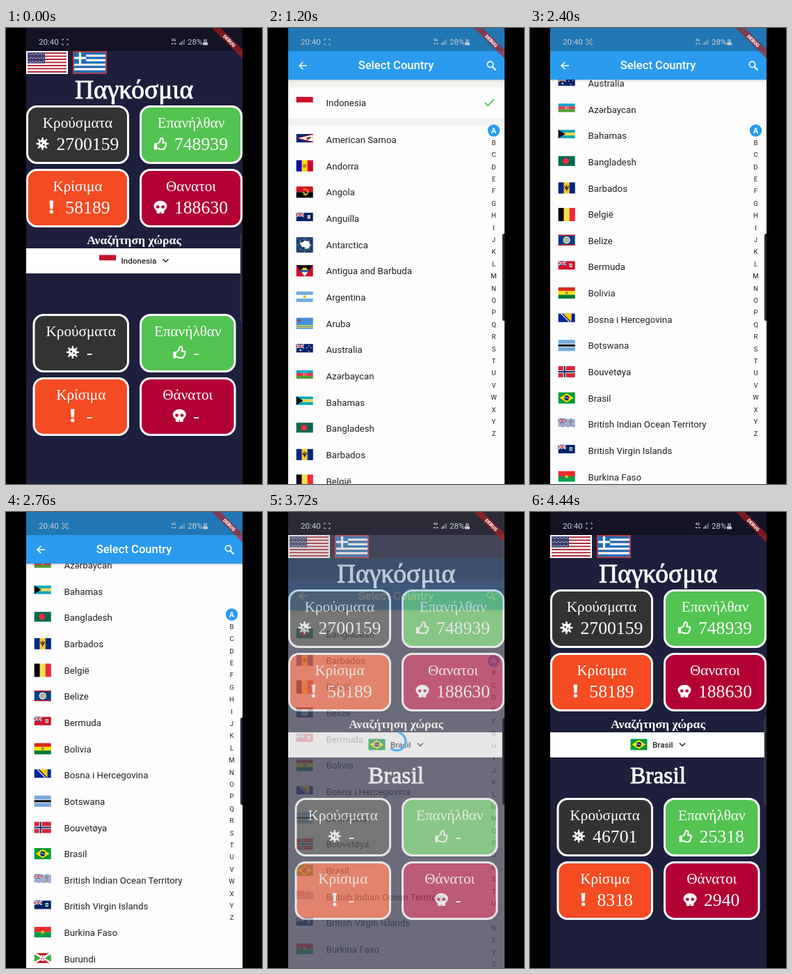
Write an HTML page that moves like this. It is 368 px wide and 654 px high and loops after 4.56 s.

```html
<!DOCTYPE html>
<html lang="el">
<head>
<meta charset="utf-8">
<title>Country statistics</title>
<style>
html, body { margin: 0; height: 100%; overflow: hidden; background: #000; }
svg { display: block; width: 100vw; height: 100vh; }
text { font-family: Roboto, sans-serif; white-space: pre; }
.serif { font-family: 'Liberation Serif', 'Times New Roman', serif; }
</style>
</head>
<body>
<svg viewBox="0 0 368 654"></svg>
<script>
const LOOP = 4560, STEP = 120;
const BLUE = '#2a9bee', NAVY = '#1e1f3c', RED = '#ce1126', WHITE = '#fff', GOLD = '#fcd116', ROYAL = '#00267f';

// Shape helpers
const rect = (x, y, w, h, fill, more = '') => `<rect x="${x}" y="${y}" width="${w}" height="${h}" fill="${fill}" ${more}/>`;
const disc = (x, y, r, fill, more = '') => `<circle cx="${x}" cy="${y}" r="${r}" fill="${fill}" ${more}/>`;
const path = (d, fill) => `<path d="${d}" fill="${fill}"/>`;
const line = (d, color, w = 1.6) => `<path d="${d}" fill="none" stroke="${color}" stroke-width="${w}"/>`;
const at = (x, y, s, id = '') => `<g id="${id}" transform="translate(${x} ${y})">${s}</g>`;
const group = (id, s) => `<g id="${id}">${s}</g>`;
const clip = (id, y, s) => `<clipPath id="${id}">${rect(29, y, 311, 654 - y, WHITE)}</clipPath><g clip-path="url(#${id})">${s}</g>`;
const text = (x, y, s, size, fill, more = '') =>
  `<text x="${x}" y="${y + size * .35}" font-size="${size}" fill="${fill}" ${more}>${s}</text>`;
const MID = 'text-anchor="middle"';
const range = n => [...Array(n).keys()];

// Flags are 24 units wide
const rows = (h, ...c) => c.map((f, i) => rect(0, i * h / c.length, 24, h / c.length + .1, f)).join('');
const cols = (h, ...c) => c.map((f, i) => rect(i * 24 / c.length, 0, 24 / c.length + .1, h, f)).join('');
const jack = (w = 11, h = 6) => rect(0, 0, w, h, '#012169') + line(`M0 0L${w} ${h}M0 ${h}L${w} 0`, WHITE, 1.2) +
  line(`M${w / 2} 0V${h}M0 ${h / 2}H${w}`, WHITE, 2) + line(`M${w / 2} 0V${h}M0 ${h / 2}H${w}`, RED, 1);
const ensign = (fill, badge) => rows(12, fill) + jack() + badge;
const shield = (x, y, fill) => rect(x - 2, y - 2.5, 4, 5, WHITE) + disc(x, y, 1.5, fill);

const flags = {
  Indonesia: [16, rows(16, '#c8102e', WHITE)],
  'American Samoa': [12, rows(12, '#002868') + path('M24 0V12L0 6Z', RED) + path('M24 1V11L3 6Z', WHITE) +
    path('M14 6l4-2 4 1-3 2-3 2z', '#7b3f1d')],
  Andorra: [16, cols(16, '#10069f', '#fedd00', '#d50032') + disc(12, 8, 2.6, '#c7784d')],
  Angola: [16, rows(16, RED, '#000') + line('M10 5a4 4 0 1 1 0 6M9 8l6 4', GOLD, 1.3)],
  Anguilla: [12, ensign('#012169', shield(18, 6, '#f58b2b'))],
  Antarctica: [22, rect(0, 0, 24, 22, '#173b67') + line('M0 0L24 22M24 0L0 22M12 0V22M0 11H24', '#8ea5bd', .5) +
    disc(12, 11, 9, 'none', 'stroke="#8ea5bd" stroke-width=".5"') + path('M5 7l3 1 4-3 6 1 2 5-2 5-5 1-1-3-4 0-2-4z', WHITE)],
  'Antigua and Barbuda': [16, rect(0, 0, 24, 16, RED) + path('M0 0H24L12 16Z', '#000') + path('M5.2 7H18.8L12 16Z', '#0072c6') +
    path('M7.5 10H16.5L12 16Z', WHITE) + path('M7 7l2-2 1-2 2 1 2-1 1 2 2 2z', GOLD)],
  Argentina: [15, rows(15, '#74acdf', WHITE, '#74acdf') + disc(12, 7.5, 1.9, '#f6b40e')],
  Aruba: [16, rect(0, 0, 24, 16, '#418fde') + rect(0, 10.5, 24, 1.2, '#fbe122') + rect(0, 13, 24, 1.2, '#fbe122') +
    path('M4 1l1 2 2 1-2 1-1 2-1-2-2-1 2-1z', '#d22630')],
  Australia: [12, ensign('#012169', [[6, 9, 1.2], [18, 2.5, .8], [15, 5.5, .8], [21, 5, .8], [18, 10, .8]].map(a => disc(...a, WHITE)).join(''))],
  'Azərbaycan': [12, rows(12, '#00a9ce', '#ef3340', '#509e2f') + disc(11.5, 6, 1.7, WHITE) + disc(12.3, 6, 1.3, '#ef3340') + disc(14, 6, .8, WHITE)],
  Bahamas: [12, rows(12, '#00a8b5', '#ffd84a', '#00a8b5') + path('M0 0L10 6L0 12Z', '#000')],
  Bangladesh: [14, rows(14, '#006a4e') + disc(11, 7, 4.4, '#f42a41')],
  Barbados: [16, cols(16, ROYAL, '#ffc726', ROYAL) + line('M9.5 5q0 4 2.5 4t2.5-4M12 4v8', '#000', 1.1)],
  'België': [19, cols(19, '#000', '#fae042', '#ed2939')],
  Belize: [15, rect(0, 0, 24, 15, '#003f87') + rect(0, 0, 24, 1.5, RED) + rect(0, 13.5, 24, 1.5, RED) + disc(12, 7.5, 5, WHITE) +
    disc(12, 7.5, 3.8, '#8fb59b') + rect(10.5, 6, 3, 3, '#d8b96a')],
  Bermuda: [12, ensign('#cf142b', shield(18, 6, '#4d8b5b'))],
  Bolivia: [16, rows(16, '#d52b1e', '#f9e300', '#007934') + disc(12, 8, 2, '#a77b38')],
  'Bosna i Hercegovina': [12, rows(12, '#002395') + path('M7 0H19V12Z', '#fecb00') + line('M4 0L16 12', WHITE, 1.2)],
  Botswana: [16, rows(16, '#75aadb') + rect(0, 5.5, 24, 5, WHITE) + rect(0, 6.5, 24, 3, '#000')],
  'Bouvetøya': [16, rect(0, 0, 24, 16, '#d72638') + line('M9 0V16M0 8H24', WHITE, 4) + line('M9 0V16M0 8H24', '#002868', 2)],
  Brasil: [16, rect(0, 0, 24, 16, '#009b3a') + path('M12 1.5L22 8L12 14.5L2 8Z', '#fedf00') + disc(12, 8, 3.6, '#002776') +
    line('M8.6 7.4q4-.6 6.6 2', WHITE, .8)],
  'British Indian Ocean Territory': [12, range(6).map(i => line(`M0 ${1 + i * 2}q2-1.6 4 0t4 0 4 0 4 0 4 0 4 0`, '#3654a0', 1)).join('') + jack() +
    line('M18 3v8M15 4q3-3 6 0', '#6d7550', 1)],
  'British Virgin Islands': [12, ensign('#012169', shield(18, 6, '#008457'))],
  'Burkina Faso': [15, rows(15, '#ef2b2d', '#009e49') + path('M12 4.5l.9 2.2 2.4 0-1.9 1.5.7 2.3-2.1-1.4-2.1 1.4.7-2.3-1.9-1.5 2.4 0z', GOLD)],
  Burundi: [14, rect(0, 0, 24, 14, '#36b13b') + path('M0 0H24L12 7ZM0 14H24L12 7Z', RED) + line('M0 0L24 14M24 0L0 14', WHITE, 2.5) +
    disc(12, 7, 4, WHITE) + disc(12, 5, 1, RED) + disc(10.3, 8, 1, RED) + disc(13.7, 8, 1, RED)],
  'Bénin': [16, rows(16, GOLD, '#e8112d') + rect(0, 0, 10, 16, '#008751')],
};
const flag = (x, y, name) => at(x, y, flags[name][1]);

// Home page
const icons = {
  virus: () => disc(0, 0, 6, WHITE) + range(8).map(i => `<g transform="rotate(${i * 45})">${rect(-1.2, -9.2, 2.4, 5, WHITE, 'rx="1.1"')}</g>`).join('') +
    disc(-2, -1, 1.5, '#333') + disc(2, 1.5, 1.2, '#333'),
  thumb: () => rect(-9, -1, 4.5, 9.5, WHITE, 'rx="1"') +
    line('M-4 0L-1-3L.5-7.8Q4.5-8.6 4-4.5L3.3-1.5H7Q9-.8 7.8 1.6Q8 4 6.8 5Q6.4 8 3 8H0L-4 6.5', WHITE, 2),
  bang: () => path('M-2.8-9.5H2.8L2 2.5H-2Z', WHITE) + disc(0, 6.6, 2.7, WHITE),
  skull: fill => `<ellipse cy="-1.5" rx="9.5" ry="7.8" fill="${WHITE}"/>` + rect(-5.5, 2, 11, 7, WHITE, 'rx="1.5"') +
    disc(-3.7, -.5, 2.3, fill) + disc(3.7, -.5, 2.3, fill) + line('M0 6.5V9', fill, 1.2),
};
const serif = (x, y, s, size, more = '') => text(x, y, s, size, WHITE, `class="serif" ${more}`);
const value = (cx, y, icon, s, fill) => {
  const left = cx - (29 + s.length * 12.86) / 2;
  return at(left + 9, y, icons[icon](fill)) + serif(left + 29, y, s, 25.7);
};
const card = (x, y, w, label, fill) =>
  rect(x + 1.5, y + 1.5, w - 3, 81, fill, 'rx="14" stroke="#fff" stroke-width="3"') + serif(x + w / 2, y + 25, label, 21.2, MID);
const kinds = [
  ['virus', '#333333', 'Κρούσματα', 'Κρούσματα'], ['thumb', '#53c351', 'Επανήλθαν', 'Επανήλθαν'],
  ['bang', '#f44b22', 'Κρίσιμα', 'Κρίσιμα'], ['skull', '#b30035', 'Θανατοι', 'Θάνατοι'],
];
const boxes = (world, draw) => kinds.map((k, i) => {
  const w = world ? 148 : 138.5, x = i % 2 ? 192 : world ? 29 : 38.5;
  return draw(k, i, x, (world ? 111 : 410) + (i >> 1) * 91, w);
}).join('');
const cards = world => boxes(world, (k, i, x, y, w) => card(x, y, w, k[world ? 2 : 3], k[1]));
const values = (world, list) => boxes(world, (k, i, x, y, w) => value(x + w / 2, y + 55, k[0], list[i], k[1]));

const bold = `${MID} stroke="#fff" stroke-width=".9"`;
const usa = rect(29, 33, 60, 33, WHITE) + range(13).map(i => rect(31, 35 + i * 2.23, 56, 2.23, i % 2 ? WHITE : '#b0323f')).join('') +
  rect(31, 35, 25, 15.6, '#3c3b6e') + range(27).map(i => disc(33 + i % 9 * 2.6, 37 + (i / 9 | 0) * 5.5 + i % 2, .7, WHITE)).join('');
const greece = rect(96, 33, 49, 33, '#b23a45') + range(9).map(i => rect(98, 35 + i * 3.22, 45, 3.3, i % 2 ? WHITE : '#1c6fb8')).join('') +
  rect(98, 35, 17, 16.1, '#1c6fb8') + line('M106.5 35V51.1M98 43H115', WHITE, 3.2);
const picked = (x, name, end) => flag(x, 325.5, name) + text(x + 31.5, 333.5, name, 11.6, '#222', 'font-weight="500"') +
  line(`M${end} 331.5l4 4 4-4`, '#222', 1.5);

const home = rect(29, 0, 311, 654, NAVY) + usa + greece +
  serif(184, 88, 'Παγκόσμια', 37.5, bold) + cards(true) + values(true, ['2700159', '748939', '58189', '188630']) +
  serif(184, 304, 'Αναζήτηση χώρας', 17.7, `${MID} font-weight="bold"`) + rect(29, 316, 311, 36, WHITE) +
  group('before', picked(134, 'Indonesia', 225.5)) +
  group('after', picked(144.5, 'Brasil', 215) + serif(184, 377, 'Brasil', 33.5, bold)) +
  cards(false) + group('blank', values(false, ['-', '-', '-', '-'])) +
  group('data', values(false, ['46701', '25318', '8318', '2940'])) +
  group('busy', rect(29, 0, 311, 654, '#9e9e9e', 'opacity=".3"') +
    at(185, 329, disc(0, 0, 13, 'none', `id="spin" stroke="${BLUE}" stroke-width="3" stroke-dasharray="48 80"`))) +
  rect(29, 0, 311, 33, '#000', 'opacity=".38"');

// Country picker
const row = (name, y) => {
  const h = flags[name][0];
  return flag(40.7, y - (h > 17 ? h / 2 : 8.5), name) + text(83.5, y, name, 13.25, '#222');
};
const list = rect(29, 74, 311, 36, '#f2f2f1') + text(41, 93, 'LAST PICK', 11.6, '#222') +
  rect(29, 154, 311, 11, '#f2f2f1') + line('M312 132l4 4 9-9', '#3dbb4a') +
  Object.keys(flags).map((n, i) => row(n, i ? 185.2 + (i - 1) * 37.65 : 132)).join('');
const letters = disc(324.5, 147, 8.7, BLUE) + range(26).map(i =>
  text(324.5, 147 + i * 17.4, String.fromCharCode(65 + i), i ? 9.6 : 11, i ? '#222' : WHITE, MID + (i ? '' : ' font-weight="700"'))).join('');
const picker = rect(29, 0, 311, 654, '#fdfdfd') + clip('body', 74, at(0, 0, list, 'list')) + letters +
  rect(29, 74, 311, 1, '#000', 'opacity=".18"') + rect(29, 75, 311, 2, '#000', 'opacity=".06"') +
  rect(29, 0, 311, 33, '#2077b3') + rect(29, 33, 311, 41, BLUE) +
  text(184, 53.5, 'Select Country', 16.6, WHITE, `${MID} font-weight="500"`) +
  line('M56 54H45.5M50.5 48.7L45.2 54l5.3 5.3', WHITE) + line('M322.5 55.5l5 5', WHITE, 1.9) +
  disc(319.5, 52.3, 4.2, 'none', 'stroke="#fff" stroke-width="1.6"');

// System overlay
const GREY = '#c9cdd2';
const system = text(47, 20, '20:40', 11.6, GREY) +
  line('M81 18v-2h2M87 16h2v2M89 22v2h-2M83 24h-2v-2', GREY, 1) + group('rec', disc(85, 20, 2.3, 'none', `stroke="${GREY}"`)) +
  text(241, 17.5, '4G', 5, GREY, MID + ' font-weight="700"') + line('M238 22.5h2.5M242 22.5h2.5', GREY, 1.5) +
  range(4).map(i => rect(249 + i * 2.2, 22 - i * 2, 1.4, 2 + i * 2, GREY, i > 1 ? 'opacity=".5"' : '')).join('') +
  text(261, 20, '28%', 11.6, GREY) + rect(284, 16, 5, 5, GREY, 'opacity=".55"') + rect(283, 21, 7, 3.5, GREY) +
  rect(337, 295, 5, 125, '#242833', 'rx="2.5" stroke="#596070" stroke-width=".6"') +
  path('M296 0H309L340 31V44Z', 'rgba(183,28,28,.63)') +
  `<g transform="translate(321 18.5) rotate(45)">${text(0, 0, 'DEBUG', 6.9, WHITE, MID + ' font-weight="900"')}</g>`;

document.querySelector('svg').innerHTML = clip('screen', 0, home + group('picker', picker) + system);

// Motion
const clamp = v => Math.min(1, Math.max(0, v));
const bezier = (x1, y1, x2, y2) => x => {
  const curve = (a, b, u) => 3 * a * u * (1 - u) ** 2 + 3 * b * u * u * (1 - u) + u ** 3;
  let lo = 0, hi = 1;
  for (let i = 0; i < 20; i++) {
    const mid = (lo + hi) / 2;
    if (curve(x1, x2, mid) < x) lo = mid; else hi = mid;
  }
  return curve(y1, y2, hi);
};
const fade = bezier(.42, 0, 1, 1), slide = bezier(.4, 0, .2, 1);
const el = id => document.getElementById(id);
const show = (id, on) => el(id).setAttribute('display', on ? 'inline' : 'none');
const move = (id, y) => el(id).setAttribute('transform', `translate(0 ${y})`);

// A short drag, then a fling slowed by friction
const scroll = t => t < 1200 ? 24.7 * clamp((t - 960) / 240) ** 2 : 24.7 + 495.7 * (1 - Math.exp(-1.23 * (Math.min(t, 3480) - 1200) / 1000));

function draw(now) {
  const t = Math.floor(now % LOOP / STEP) * STEP;
  const open = t < 2000 ? clamp((t - 201) / 300) : 1 - clamp((t - 3537) / 300);
  const chosen = t > 3500, loaded = t >= 4320;
  show('picker', open > 0);
  el('picker').setAttribute('opacity', fade(open));
  move('picker', 163.5 * (1 - slide(open)));
  move('list', -scroll(t));
  show('before', !chosen);
  show('after', chosen);
  show('blank', !loaded);
  show('data', loaded);
  show('busy', chosen && !loaded);
  el('spin').setAttribute('transform', `rotate(${(t - 3720) * .6 - 80})`);
  show('rec', t > 1800 && t < 3600);
}
const start = performance.now();
(function tick() {
  draw(performance.now() - start);
  requestAnimationFrame(tick);
})();
</script>
</body>
</html>
```
